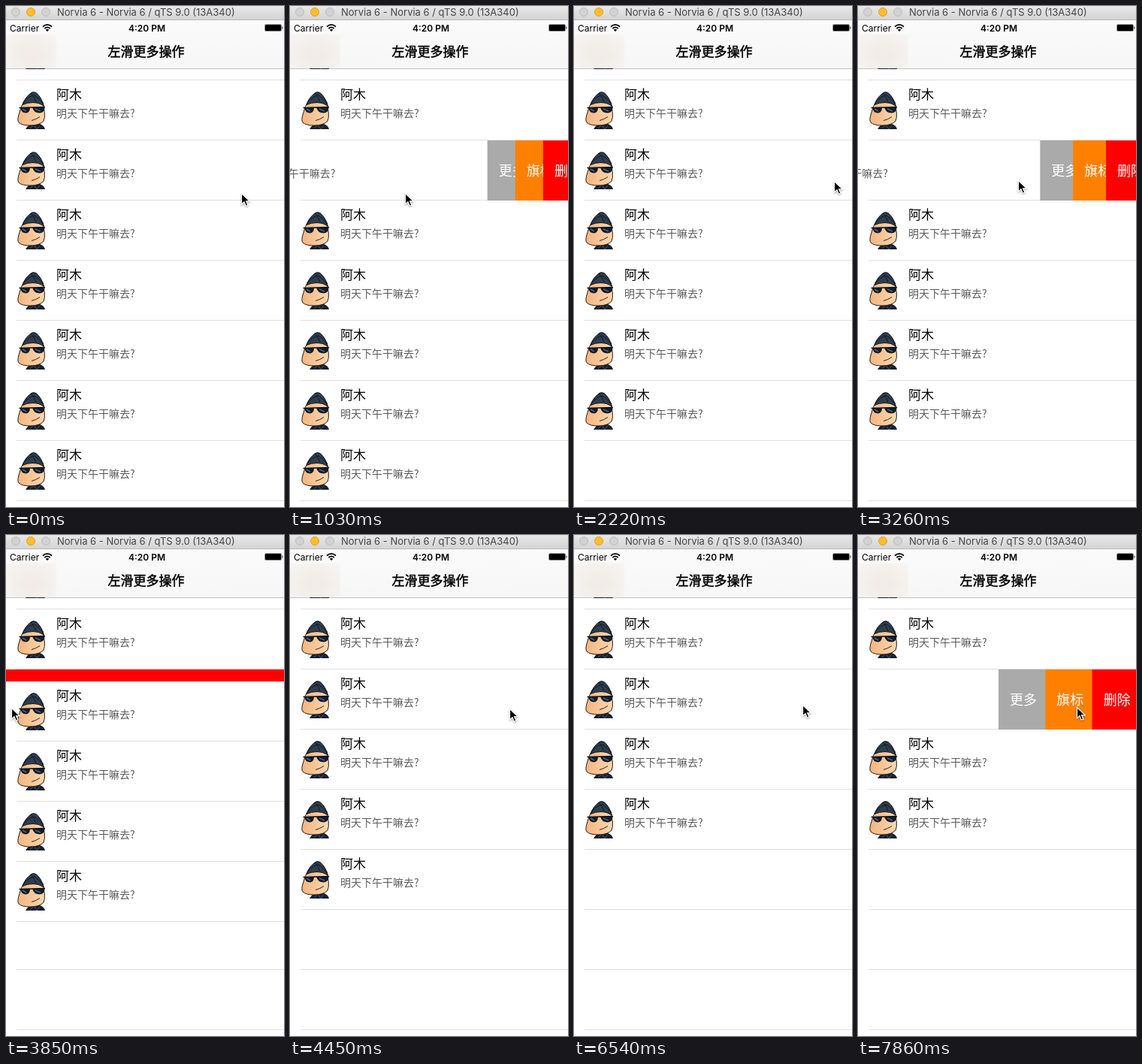
Recreate the animation shown at these times as an HTML page. Size 370 px wide and 667 px high, loop 8000 ms.

```html
<!DOCTYPE html>
<html lang="zh-CN">
<head>
<meta charset="utf-8">
<title>左滑更多操作</title>
<style>
html, body { margin: 0; width: 100%; height: 100%; overflow: hidden; background: #fff; }
#stage { position: relative; width: 370px; height: 667px; overflow: hidden; background: #fff;
  font-family: "Noto Sans CJK SC", "Noto Sans CJK", "Noto Sans", sans-serif; color: #000; white-space: nowrap; }
#stage div, #stage span, #stage svg { position: absolute; }
.line { left: 14px; width: 360px; height: 1px; background: #e0e0e2; }
.row { left: 0; width: 374px; height: 80px; background: #fff; overflow: hidden; }
.row .line { top: 79px; }
.body { left: 0; top: 0; width: 374px; height: 79px; }
.body svg { left: 15px; top: 15px; }
.name { left: 67px; top: 6px; font-size: 17px; line-height: 24px; }
.note { left: 67px; top: 31px; font-size: 14px; line-height: 24px; color: #5c5c5c; }
.act { left: 0; top: 0; width: 376px; height: 80px; color: #fff; font-size: 18px; line-height: 79px; text-indent: 15px; }
#rest { left: 0; width: 374px; }
#nav { left: 0; top: 19px; width: 370px; height: 64px; border-bottom: 1px solid #0000003d;
  background: linear-gradient(#fafafa, #f7f7f7) padding-box; }
#blur { left: 0; top: 19px; width: 67px; height: 45px;
  background: radial-gradient(ellipse at 50% 60%, #f1ece7 20%, #f4f1ee 65%, #f7f6f5 100%); }
#title { left: 0; width: 373px; top: 28px; text-align: center; font-size: 17px; line-height: 26px; -webkit-text-stroke: .5px #000; }
.sys { font: 12px/14px Inter, sans-serif; top: 4px; }
#bar { left: 0; top: 0; width: 370px; height: 18px; background: linear-gradient(#e8e8e8, #d4d4d4); border-bottom: 1px solid #b9b9b9; }
#bar span { left: 68px; top: 0; font: 13px/17px Inter, sans-serif; color: #454545; }
#bar i { position: absolute; top: 2px; width: 10px; height: 10px; border-radius: 50%; border: 1px solid #bcbcbc; background: #d2d2d2; }
#bar i.on { background: #fdbd2f; border-color: #dfa023; }
#cursor { left: 0; top: 0; overflow: visible; }
</style>
</head>
<body>
<svg width="0" height="0" style="position:absolute">
  <linearGradient id="skin"><stop stop-color="#f3b681"/><stop offset="1" stop-color="#fbd7ae"/></linearGradient>
  <symbol id="face" viewBox="0 0 37 50">
    <path d="M11 50Q14 44 21 42L30 43Q36 45 37 50Z" fill="#17202c"/>
    <path d="M17 49L22 44 26 50 30 45" fill="none" stroke="#47586b"/>
    <path d="M9 13Q4 21 2.500 29Q-.5 38 2 41Q6 45 17 45Q30 45 35 39Q37 35 36.300 28L34 14Z" fill="url(#skin)" stroke="#2a1a12"/>
    <path d="M7 17.500Q10 8 18 2Q21 -.5 25 1.500Q32 7 35.500 19Q28 14 21 14.500Q13 14.500 7 17.500Z" fill="#2e3e4e" stroke="#0b1119"/>
    <path d="M9 14Q15 6 23 5Q31 10 34 16M18 2Q23 7 25 14" fill="none" stroke="#111a24"/>
    <path d="M2.500 21.500L37 20.500" stroke="#0a0e14" stroke-width="1.400"/>
    <path d="M4 21H17Q17 28 12 28.500Q5 28.500 4 21ZM20 21H36.500Q36.500 28 30 28.500Q22 28.500 20 21Z" fill="#131b27"/>
    <path d="M7 23L12 26M24 23L31 26" stroke="#4a6485" stroke-width="1.500"/>
    <path d="M19 38.500Q25 37 30 33.500" fill="none" stroke="#3b2218"/>
  </symbol>
</svg>
<div id="stage">
  <div id="table"></div>
  <div id="nav">
    <div id="blur"></div>
    <span class="sys" style="left:5px">Carrier</span>
    <svg style="left:48px;top:4px" width="14" height="12" fill="none" stroke="#000" stroke-width="1.700">
      <path d="M1 4.500Q7 -.8 13 4.500M3.300 7Q7 3.700 10.700 7"/><path d="M7 11L4.800 8.700Q7 7 9.200 8.700Z" fill="#000" stroke="none"/>
    </svg>
    <span class="sys" style="left:163px;font-weight:600">4:20 PM</span>
    <svg style="left:344px;top:5px" width="26" height="10">
      <rect x=".5" y=".5" width="22" height="9" rx="1.500" fill="none" stroke="#0006"/>
      <rect x="1" y="1" width="21" height="8" rx="1"/><path d="M23.500 3Q25.500 5 23.500 7Z"/>
    </svg>
    <div id="title">左滑更多操作</div>
  </div>
  <div id="bar">
    <i style="left:7px"></i><i class="on" style="left:27px"></i><i style="left:47px"></i>
    <span>Norvia 6 - Norvia 6 / qTS 9.0 (13A340)</span>
  </div>
  <svg id="cursor" width="13" height="19">
    <path d="M.5 .5V15L4 11.800 6.300 17.300 8.900 16.200 6.600 10.800H11.300Z" stroke="#fff" stroke-width="1.200"
      style="filter:drop-shadow(0 1px 1px #0006)"/>
  </svg>
</div>
<script>
const LOOP = 8000, TICKS = 54, WIDTH = 374, ROW = 80, TOP = 19, OPEN = 198.5, FOLD = 2.1;
const $ = id => document.getElementById(id);

const row = (y, actions = '') => `<div class="row" style="top:${y}px"><div class="line"></div>
  <div class="body"><svg width="37" height="50"><use href="#face"/></svg>
  <span class="name">阿木</span><span class="note">明天下午干嘛去?</span></div>${actions}</div>`;
const acts = [['更多', '#aaa'], ['旗标', '#ff8000'], ['删除', '#f00']]
  .map(([label, color]) => `<div class="act" style="background:${color}">${label}</div>`).join('');

let html = '';
for (let i = 1; i <= 8; i++) html += `<div class="line" style="top:${TOP + ROW * i - 1}px"></div>`;
html += row(TOP) + row(TOP + ROW) + row(TOP + 2 * ROW, acts) + '<div id="rest">';
for (let i = 0; i < 5; i++) html += row(i * ROW);
$('table').innerHTML = html + '</div>';

const rest = $('rest'), buttons = [...document.querySelectorAll('.act')];
const content = buttons[0].parentNode.querySelector('.body');

// All times are in ticks; each swipe ends with its row folding away.
const swipes = [
  { from: 5, to: 8.7, reach: OPEN, fold: 12.5 },
  { from: 20, to: 25, reach: WIDTH, fold: 24.5 },
  { from: 33, to: 36, reach: OPEN, fold: 38.5 },
  { from: 45, to: 49, reach: OPEN - 11.5, fold: TICKS },
];
// Pointer moves: start, end, x, y
const home = [313, 249];
const moves = [
  [3, 7, 153, 249], [8, 11, 346, 233], [19, 26, 7, 230], [26, 30, 292, 231], [33, 36, 105, 230],
  [36, 38, 335, 231], [40, 42, 304, 226], [44, 48, 150, 242], [49, 51, 336, 240], [51, 53, 291, 229],
];

function ease(k, from, to) {
  const t = Math.min(1, Math.max(0, (k - from) / (to - from)));
  return t * t * (3 - 2 * t);
}
const pointer = k => moves.reduce(([x, y], [from, to, mx, my]) => {
  const e = ease(k, from, to);
  return [x + (mx - x) * e, y + (my - y) * e];
}, home);
const shift = (el, x, y = 0) => { el.style.transform = `translate(${x}px,${y}px)`; };

function draw(now) {
  const k = Math.min(TICKS - 1, Math.floor((now % LOOP + 14) * TICKS / LOOP));
  const gone = swipes.filter(s => k >= s.fold + FOLD).length;
  const { from, to, reach, fold } = swipes[gone];
  const off = reach * ease(k, from, to);
  shift(content, -off);
  buttons.forEach((b, i) => {
    const full = i === 2 && off >= WIDTH;
    shift(b, full ? 0 : WIDTH - off * (3 - i) / 3);
    b.style.visibility = off > 0 ? 'visible' : 'hidden';
  });
  rest.style.top = TOP + 3 * ROW - ROW * ease(k, fold, fold + FOLD) + 'px';
  [...rest.children].forEach((r, i) => { r.style.display = i < 5 - gone ? '' : 'none'; });
  shift($('cursor'), ...pointer(k).map(Math.round));
  requestAnimationFrame(draw);
}
requestAnimationFrame(draw);
</script>
</body>
</html>
```
